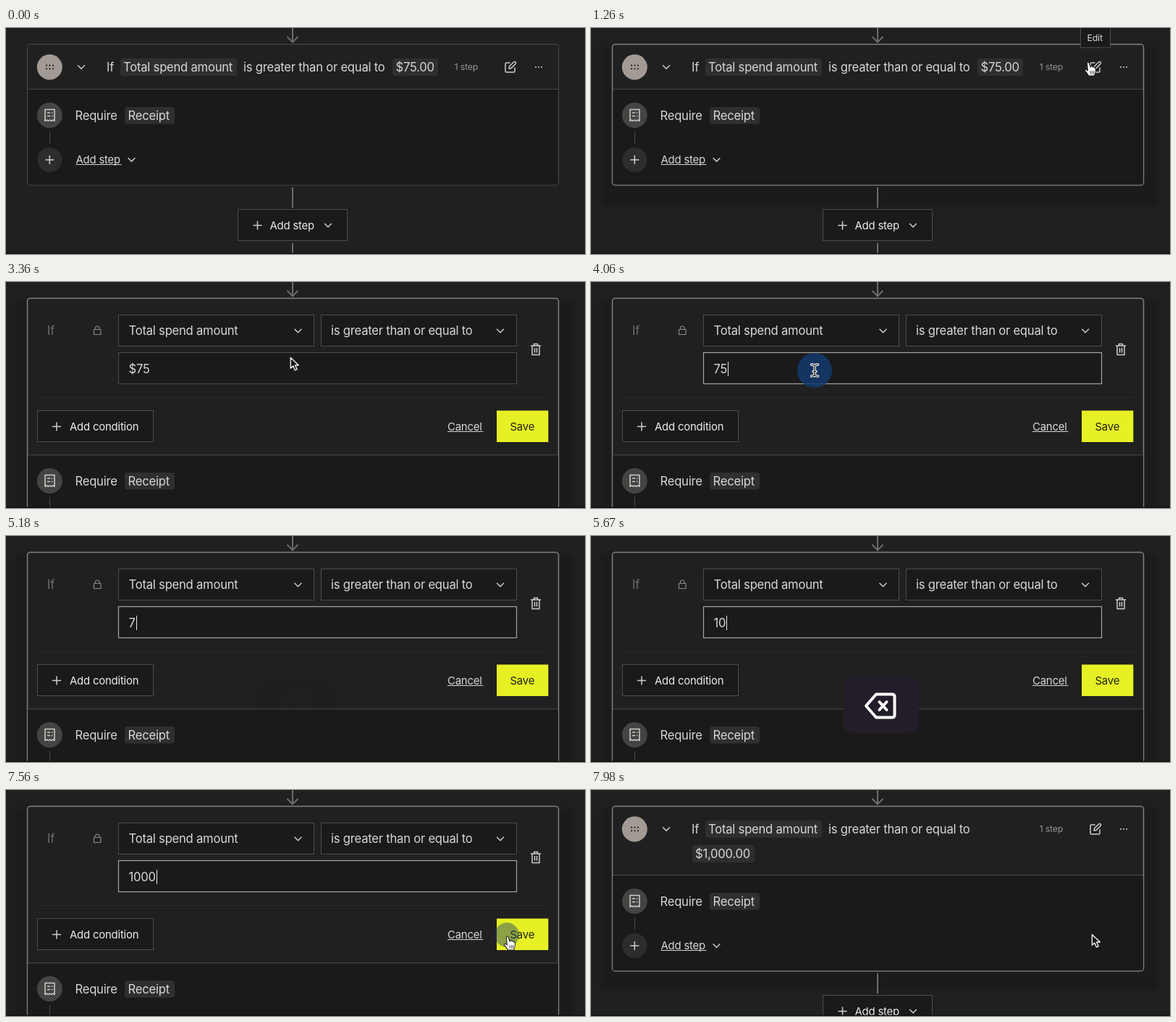
Recreate the animation shown at these times as an HTML page. Size 800 by 312 pixels, loop 8000 ms.

```html
<!DOCTYPE html>
<html lang="en">
<head>
<meta charset="utf-8">
<title>Edit a workflow condition</title>
<style>
  html, body { margin: 0; width: 100%; height: 100%; overflow: hidden; background: #202020; }
  svg { display: block; width: 100vw; height: 100vh; }
  text, .field { font-family: Inter, sans-serif; font-size: 16.6px; letter-spacing: -.013em; }
  text { fill: #dad8d6; }
  .mid { font-size: 14.9px; }
  .small { font-size: 12.3px; }
  .white { fill: #eeecea; }
  .icon { fill: none; stroke: #d0cecc; stroke-width: 1.5; stroke-linecap: round; stroke-linejoin: round; }
  .pill { fill: #2f2f2f; }
  .body { fill: #1a1a1a; }
  .box { fill: #1a1a1a; stroke: #4c4c4c; }
  .rule { stroke: #4a4a4a; }
  .flow { fill: none; stroke: #6c6c6c; stroke-width: 2; }
  .card { fill: #202020; stroke: #808080; stroke-width: 1.5; }
  .shade { fill: #1b1b1b; filter: blur(3px); }
  .field { height: 44px; line-height: 44px; color: #dad8d6; white-space: pre; }
  .caret { display: inline-block; width: 1px; height: 20px; margin-left: 1px; background: #e8e8e8; vertical-align: -4px; }

  .loop { animation: 8s linear infinite; }
  .hover { animation-name: hover; }
  .fade { animation-name: fade; }
  .tip { animation-name: tip; }
  .lower { animation-name: lower; }
  .key { animation-name: key; }
  .cursor { animation-name: move; }
  .click { animation-name: click; }

  @keyframes hover {
    0%, 7.9% { stroke: #4a4a4a; stroke-width: 1; }
    10.5%, 100% { stroke: #808080; stroke-width: 1.5; }
  }
  @keyframes fade { 0%, 7.9% { opacity: 0; } 10.5%, 100% { opacity: 1; } }
  @keyframes tip { 0%, 13.1% { opacity: 0; } 14.9%, 100% { opacity: 1; } }
  @keyframes lower { 0%, 95.374% { transform: none; } 95.375%, 100% { transform: translateY(33px); } }
  @keyframes key {
    0%, 64.75% { opacity: 0; }
    66.5%, 71% { opacity: 1; }
    72.625%, 100% { opacity: 0; }
  }
  @keyframes move {
    0%, 6.125% { transform: translate(600px, 270px); animation-timing-function: cubic-bezier(.4, 0, .2, 1); }
    15.75%, 37.625% { transform: translate(686px, 45px); animation-timing-function: cubic-bezier(.4, 0, .2, 1); }
    46.375%, 84.875% { transform: translate(309px, 122px); animation-timing-function: cubic-bezier(.33, 1, .68, 1); }
    93.625%, 100% { transform: translate(692px, 200px); }
  }
  @keyframes click {
    0%, 21.875% { opacity: 0; transform: scale(.4); }
    23.625%, 25.4% { opacity: .85; transform: none; }
    28%, 28.1% { opacity: 0; transform: none; }
    28.2%, 48.125% { opacity: 0; transform: scale(.4); }
    49.875%, 51.6% { opacity: .85; transform: none; }
    54.25%, 54.3% { opacity: 0; transform: none; }
    54.4%, 93.625% { opacity: 0; transform: scale(.4); }
    95.375%, 96.5% { opacity: .85; transform: none; }
    99.5%, 100% { opacity: 0; transform: none; }
  }
</style>
</head>
<body>
<svg viewBox="0 0 800 312" preserveAspectRatio="none">
  <defs>
    <path id="chevron" class="icon" d="M-4.5-2.2 0 2.3 4.5-2.2"/>
    <path id="plus" class="icon" d="M-5.5 0H5.5M0-5.5V5.5"/>
    <path id="beam" d="M-4.5-8Q-.5-8 0-6 .5-8 4.500-8M0-6V6M-4.500 8Q-.5 8 0 6 .5 8 4.500 8M-2 1.500h4"/>
    <g id="require">
      <circle cx="60.300" cy="120.500" r="17.500" fill="#454443"/>
      <path class="icon" d="M54 112.500h13v16l-2.200-1.600-2.100 1.600-2.200-1.600-2.200 1.600-2.100-1.600-2.200 1.600zM57.500 117h3M63.500 117h.4M57.500 121.500h3M63.500 121.500h.4"/>
      <path class="rule" d="M60.500 143v17"/>
      <text x="95.500" y="126.500">Require</text>
      <rect class="pill" x="164" y="109" width="69" height="23.500" rx="4"/>
      <text x="168.500" y="126.500">Receipt</text>
    </g>
  </defs>

  <rect width="800" height="312" fill="#202020"/>

  <g data-on="0,1890 7630,8000">
    <g data-on="0,7630">
      <rect class="shade loop fade" x="14" y="26" width="770" height="220"/>
      <rect class="card loop hover" x="29.5" y="22.5" width="734" height="194.5" rx="4"/>
    </g>
    <g data-on="7630,8000">
      <rect class="shade" x="14" y="26" width="770" height="250"/>
      <rect class="card" x="29.5" y="22.5" width="734" height="227.5" rx="4"/>
      <rect class="pill" x="140" y="76" width="86" height="24" rx="4"/>
      <text x="144" y="93.7">$1,000.00</text>
    </g>

    <circle cx="60.3" cy="54" r="17.5" fill="#a29a94"/>
    <path d="M56 51.7h0M60.5 51.7h0M65 51.7h0M56 56.3h0M60.5 56.3h0M65 56.3h0" stroke="#222" stroke-width="2.2" stroke-linecap="round"/>
    <use href="#chevron" x="104" y="54"/>
    <text x="139" y="60">If</text>
    <rect class="pill" x="158" y="42" width="161" height="24" rx="4"/>
    <text x="162" y="60">Total spend amount</text>
    <text x="328" y="60">is greater than or equal to</text>
    <g data-on="0,7630">
      <rect class="pill" x="534" y="42" width="63" height="24" rx="4"/>
      <text x="538.5" y="60">$75.00</text>
    </g>
    <text class="small" x="619.5" y="58.3" style="fill:#969492">1 step</text>
    <path class="icon" d="M696 48h-4.500q-1.500 0-1.500 1.500v10q0 1.500 1.500 1.500h10q1.500 0 1.500-1.500V55M695 56l.6-3.200 6.200-6q1.200-.8 2.200.2t.2 2.200l-6.100 6.200z"/>
    <path d="M732 54h0M736 54h0M740 54h0" stroke="#d0cecc" stroke-width="2" stroke-linecap="round"/>

    <g class="loop lower">
      <rect class="body" x="30.2" y="85" width="732.6" height="131.2" rx="3"/>
      <path class="rule" d="M30 84.500H763"/>
      <use href="#require"/>
      <circle cx="60.3" cy="182" r="17" fill="#2d2d2d"/>
      <use href="#plus" x="60.3" y="182"/>
      <text class="mid" x="96.500" y="187">Add step</text>
      <path d="M96.500 188.500h63" stroke="#d6d4d2"/>
      <use href="#chevron" x="173.500" y="182"/>
      <path class="flow" d="M396 220v28M396 297v20"/>
      <rect class="box" x="320.500" y="250.500" width="151" height="43"/>
      <use href="#plus" x="347.500" y="272.500"/>
      <text class="mid white" x="364.500" y="277.700">Add step</text>
      <use href="#chevron" x="445" y="272.500"/>
    </g>
  </g>

  <g data-on="1890,7630">
    <rect class="shade" x="14" y="26" width="770" height="310"/>
    <rect class="card" x="29.5" y="22.5" width="734" height="320" rx="4"/>
    <rect class="body" x="30.2" y="239" width="732.6" height="80"/>
    <path class="rule" d="M30 238.800H763"/>
    <text x="57" y="73" style="fill:#6f6e6d">If</text>
    <path class="icon" style="stroke:#8a8886;stroke-width:1.2" d="M121.500 65.500h9.500v7h-9.500zM123.500 65.500v-2q.2-2.500 2.700-2.500t2.800 2.500v2"/>
    <rect class="box" x="155.5" y="45.5" width="270" height="43"/>
    <rect class="box" x="435.5" y="45.5" width="270" height="43"/>
    <path data-on="1890,3290" d="M435 88.500h271" stroke="#9a9a9a"/>
    <text x="169.500" y="73">Total spend amount</text>
    <text x="449" y="73">is greater than or equal to</text>
    <use href="#chevron" x="403.500" y="67.500"/>
    <use href="#chevron" x="683" y="67.500"/>
    <rect class="box" x="155.5" y="97.5" width="550" height="43"/>
    <rect data-on="3850,7630" x="155.5" y="97.5" width="550" height="43" fill="none" stroke="#a5a5a5" stroke-width="1.2"/>
    <g id="values"></g>
    <path class="icon" d="M725.500 88h13M729.500 88v-2.500h5V88M727 88v12.500h10V88M730.500 91.500v5.500M733.500 91.500v5.500"/>
    <path d="M43 159.500H749" stroke="#2d2d2d"/>
    <rect class="box" x="43.5" y="177.5" width="160" height="43"/>
    <use href="#plus" x="70" y="199.500"/>
    <text class="mid white" x="88" y="204.700">Add condition</text>
    <text class="mid" x="610" y="204.700">Cancel</text>
    <path d="M610 206.500h49.500" stroke="#d6d4d2"/>
    <rect x="678" y="177.500" width="71.300" height="43.500" fill="#e6f024"/>
    <text class="mid" x="696.500" y="204.700" style="fill:#20210c">Save</text>
    <use href="#require" y="154"/>
  </g>

  <path class="flow" d="M396 0V19M388.500 12l7.500 7.500 7.500-7.500"/>

  <g data-on="0,1890"><g class="loop tip">
    <rect class="box" x="676.500" y="-3" width="41" height="30"/>
    <text class="small" x="685.500" y="17.700">Edit</text>
  </g></g>

  <g class="loop key">
    <rect x="348" y="195" width="105" height="77" rx="12" fill="#221d29"/>
    <path d="M394 218.500h22q3.500 0 3.500 3.500v25q0 3.500-3.500 3.500h-22L380 234.500zM398.500 229l10 11M408.500 229l-10 11" fill="none" stroke="#fff" stroke-width="4" stroke-linejoin="round" stroke-linecap="round"/>
  </g>

  <rect y="310.600" width="800" height="1.400" fill="#170f12"/>

  <g class="loop cursor">
    <circle class="loop click" r="24" fill="#143a70"/>
    <path data-on="490,1050 1890,3430 6860,7000 7630,8000" d="M.3-.5V14.200l3.500-3.200 2.600 5.900 2.800-1.200-2.600-5.700h4.700z" fill="#151515" stroke="#fff" stroke-width="1.300" stroke-linejoin="round"/>
    <g data-on="1050,1890 7000,7630" transform="scale(1 1.13)">
      <path d="M-.5 3Q0 .8 1.800 2.200L4 8l.5-1.200q1.400-.8 2.300.9 1.500-.9 2.400.9 1.800-.5 2.100 1.500.7 4-1.800 8.500H1.500Q-.5 15-3.800 12.300q.4-2 2.600-1.100l1.500 1z" fill="#fff" stroke="#151515"/>
      <path d="M4 12.500v4M6.300 12.500v4M8.500 12.500v4" stroke="#222" stroke-width=".8"/>
    </g>
    <g data-on="3430,5180 6790,6860" fill="none" stroke-linecap="round">
      <use href="#beam" stroke="#fff" stroke-width="3.400"/>
      <use href="#beam" stroke="#111" stroke-width="1.200"/>
    </g>
  </g>
</svg>
<script>
  const LOOP = 8000;
  const caretOn = "3850,4900 5180,6510 6790,7630";
  const typed = [
    ["$75", 1890], ["75", 3850], ["7", 5180], ["", 5320], ["1", 5600],
    ["10", 5670], ["100", 5950], ["1000", 6160], ["", 7630]
  ];

  document.getElementById("values").innerHTML = typed.slice(0, -1).map(([value, start], i) => `
    <foreignObject x="169.5" y="97.5" width="300" height="44" data-on="${start},${typed[i + 1][1]}">
      <div xmlns="http://www.w3.org/1999/xhtml" class="field">${value}${i ? `<i class="caret" data-on="${caretOn}"></i>` : ""}</div>
    </foreignObject>`).join("");

  // Shows an element only inside its "from,to" windows, with hard cuts.
  function showDuring(el) {
    const frames = [{ offset: 0, opacity: 0 }];
    for (const span of el.dataset.on.split(" ")) {
      const [from, to] = span.split(",").map(Number);
      if (from === 0) frames.pop();
      frames.push({ offset: from / LOOP, opacity: 1 });
      frames.push({ offset: to / LOOP, opacity: to === LOOP ? 1 : 0 });
    }
    if (frames.at(-1).offset < 1) frames.push({ offset: 1, opacity: 0 });
    frames.forEach(frame => frame.easing = "steps(1, end)");
    el.animate(frames, { duration: LOOP, iterations: Infinity });
  }
  document.querySelectorAll("[data-on]").forEach(showDuring);
</script>
</body>
</html>
```
